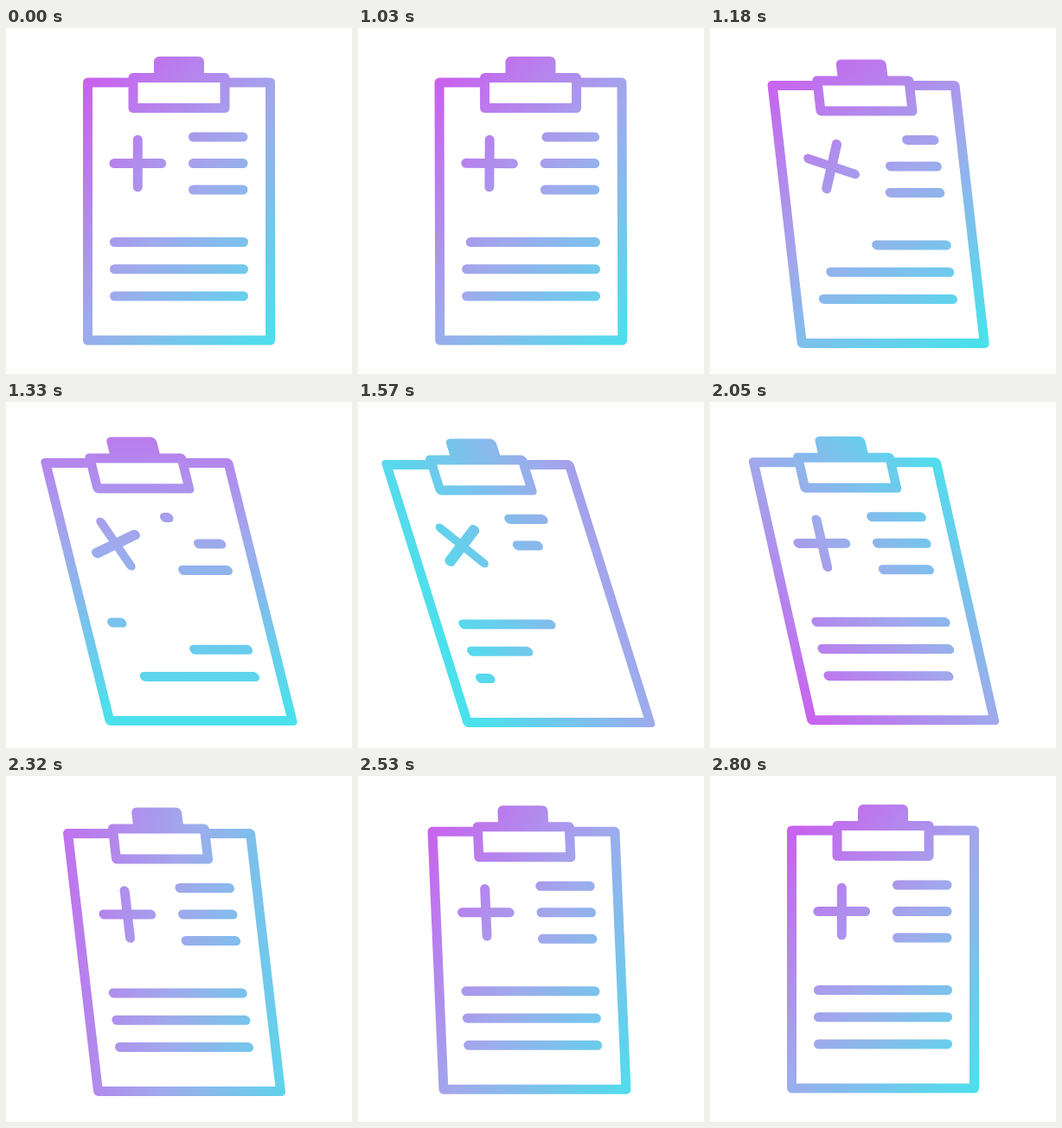
An HTML page with a canvas that plays this animation: 400x400 px, repeating every 2.83 s.

```html
<!DOCTYPE html>
<html lang="en">
<head>
<meta charset="utf-8">
<title>Medical clipboard</title>
<style>
  html, body { margin: 0; width: 100%; height: 100%; overflow: hidden; background: #fff; }
  canvas { display: block; width: 400px; height: 400px; }
</style>
</head>
<body>
<canvas id="stage" width="400" height="400"></canvas>
<script>
const ctx = document.getElementById('stage').getContext('2d');
const LOOP = 2830, START = 1000;

const progress = (t, length, from = START) => Math.min(1, Math.max(0, (t - from) / length));

function bezier(x1, y1, x2, y2) {
  const at = (s, a, b) => 3 * (1 - s) * (1 - s) * s * a + 3 * (1 - s) * s * s * b + s * s * s;
  return x => {
    if (x <= 0 || x >= 1) return x <= 0 ? 0 : 1;
    let lo = 0, hi = 1;
    for (let i = 0; i < 24; i++) {
      const mid = (lo + hi) / 2;
      if (at(mid, x1, x2) < x) lo = mid; else hi = mid;
    }
    return at(lo, y1, y2);
  };
}

const easeLean = bezier(0.33, 0, 0.25, 1);
const easeBack = bezier(0.33, 0, 0.67, 1);
const easeCross = bezier(0.33, 0, 0.3, 1);
const easeColour = bezier(0.3, 0, 0.4, 1);
const easeLine = bezier(0.25, 0.1, 0.25, 1);

// The gradient turns once; its purple end swings far out on the way
function makeGradient(t) {
  const angle = (40 + 360 * easeColour(progress(t, 1800))) * Math.PI / 180;
  const swing = Math.sin(Math.PI * progress(t, 1050)) ** 3;
  const inner = 185 - 75 * swing, outer = 185 + 125 * swing;
  const dx = Math.cos(angle), dy = Math.sin(angle);
  const g = ctx.createLinearGradient(
    200 - dx * outer, 212 - dy * outer, 200 + dx * inner, 212 + dy * inner);
  g.addColorStop(0, '#cb5eee');
  g.addColorStop(0.5, '#a0a9ec');
  g.addColorStop(1, '#4be1ec');
  return g;
}

function line(x1, y1, x2, y2) {
  ctx.beginPath();
  ctx.moveTo(x1, y1);
  ctx.lineTo(x2, y2);
  ctx.stroke();
}

// Three lines, each wiped out from the left and then written again
function paragraph(t, left, right, top, gap, stagger) {
  for (let i = 0; i < 3; i++) {
    const y = top + i * gap;
    const u = 2 * easeLine(progress(t, 1060, START + i * stagger));
    if (Math.abs(u - 1) < 0.02) continue;
    const at = k => left + (right - left) * k;
    line(at(u < 1 ? u : 0), y, at(u < 1 ? 1 : u - 1), y);
  }
}

function cross(t, x, y, arm) {
  const angle = Math.PI * easeCross(progress(t, 1100));
  const dx = arm * Math.cos(angle), dy = arm * Math.sin(angle);
  line(x - dx, y - dy, x + dx, y + dy);
  line(x + dy, y - dx, x - dy, y + dx);
}

function board(paint) {
  ctx.strokeRect(94.5, 63, 211, 298);
  ctx.fillStyle = '#fff';
  ctx.fillRect(147, 57.5, 106, 35);
  ctx.strokeRect(147, 57.5, 106, 35);
  ctx.fillStyle = paint;
  ctx.beginPath();
  ctx.roundRect(171, 33, 58, 25, [6, 6, 0, 0]);
  ctx.fill();
}

function draw() {
  const t = performance.now() % LOOP;
  const lean = easeLean(progress(t, 640)) - easeBack(progress(t, 1160, 1640));
  const skew = 0.316 * lean;

  ctx.resetTransform();
  ctx.clearRect(0, 0, 400, 400);
  ctx.transform(1, 0, skew, 1, -200 * skew - 18.5 * lean, 9.6 * lean);

  const paint = makeGradient(t);
  ctx.strokeStyle = paint;
  ctx.lineWidth = 11;
  ctx.lineCap = ctx.lineJoin = 'round';

  board(paint);
  cross(t, 152.3, 156.5, 27.3);
  paragraph(t, 216.5, 274, 126, 30.5, 129);
  paragraph(t, 125.5, 274.5, 247.5, 31.25, 120);
  requestAnimationFrame(draw);
}
draw();
</script>
</body>
</html>
```
